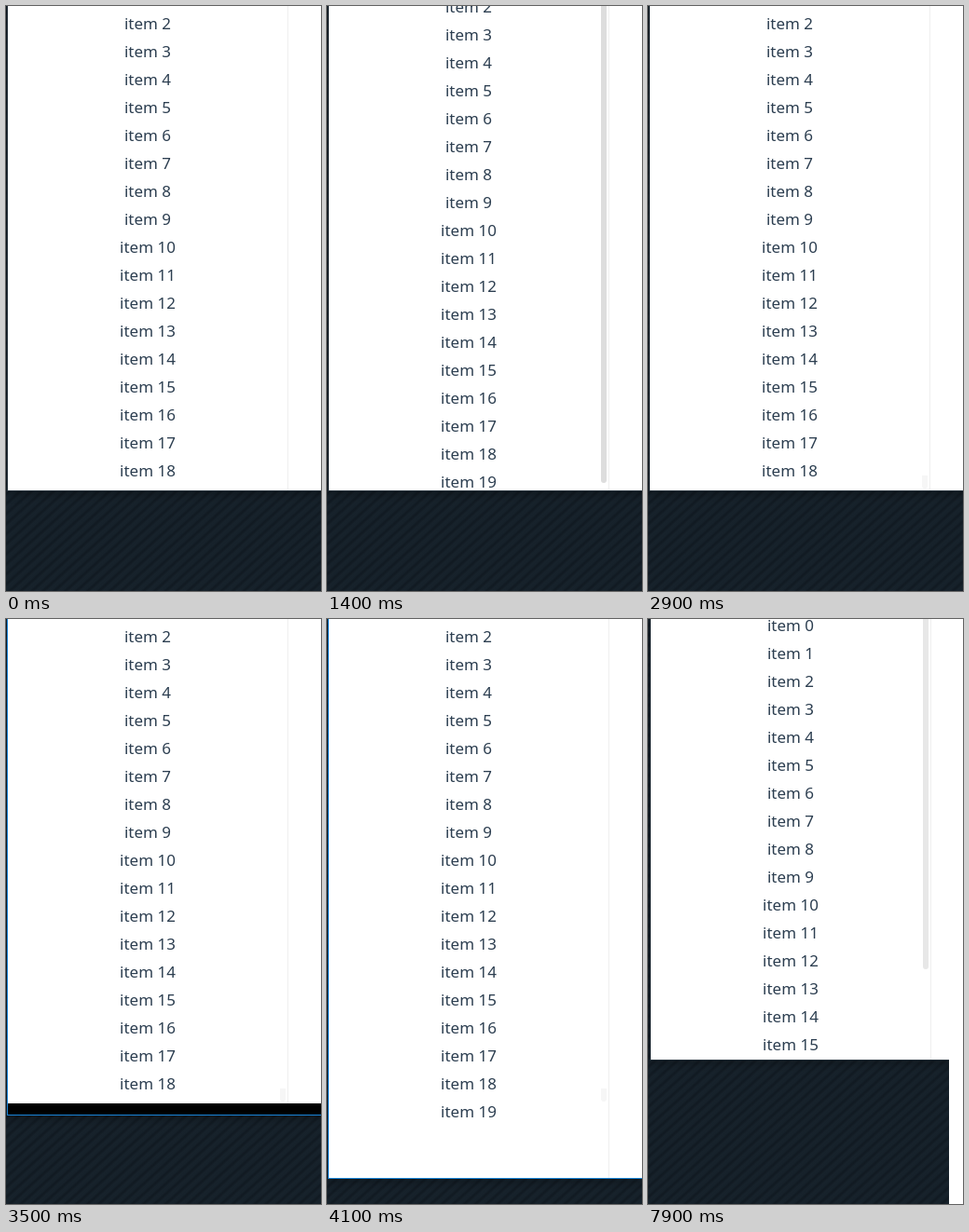
An HTML page for the animation above (8000 ms loop, 338 by 628 pixels).

```html
<!DOCTYPE html>
<html lang="en">
<head>
<meta charset="utf-8">
<title>Resizable scroll list</title>
<style>
  html, body { margin: 0; width: 100%; height: 100%; overflow: hidden; }
  #stage {
    position: relative; width: 338px; height: 628px; overflow: hidden;
    background: repeating-linear-gradient(138deg,
      #17222b 0, #16212a 3px, #111a22 5px, #121b23 6px, #17222b 8px);
  }
  #stage div, #stage svg { position: absolute; }
  #stage * { animation: 8s step-end infinite; }

  #win {
    left: 1px; top: 0; width: 360px; height: 520px;
    border: solid #26313a; border-width: 0 0 1px 1px;
    background: #000; box-shadow: 0 2px 10px rgba(0, 0, 0, .35);
    animation-name: win !important;
  }
  #panel {
    left: 0; top: 0; width: 100%; height: 520px; overflow: hidden;
    background: #fff; animation-name: panel !important;
  }
  #divider { left: 300px; top: 0; width: 1px; height: 100%; background: #efefef; }
  #list {
    left: 0; top: 0; width: 300px; height: 600px; overflow: visible;
    font: 17px "Noto Sans", "Open Sans", sans-serif; fill: #2c3e50;
    text-anchor: middle; animation-name: scroll !important;
  }
  #thumb, #trail { left: 292px; width: 6px; }
  #thumb {
    top: -20px; height: 515px; border-radius: 3px; background: #ddd;
    animation-name: thumb !important;
  }
  #trail {
    top: 504px; height: 14px; border-radius: 0 0 3px 3px; background: #f6f6f6;
    animation-name: trail !important;
  }
  #margin {
    left: 323px; top: 0; width: 15px; height: 628px; background: #fff;
    animation-name: margin !important;
  }

  /* Focus, drag the lower edge, release, then jump to the smaller window */
  @keyframes win {
    0%     { left: 1px; height: 520px; border-color: #26313a; }
    41.25% { left: 1px; height: 520px; border-color: #1883d7; }
    43.75% { left: 1px; height: 532px; border-color: #1883d7; }
    45%    { left: 1px; height: 546px; border-color: #1883d7; }
    46.25% { left: 1px; height: 560px; border-color: #1883d7; }
    47.5%  { left: 1px; height: 573px; border-color: #1883d7; }
    48.75% { left: 1px; height: 585px; border-color: #1883d7; }
    50%    { left: 1px; height: 595px; border-color: #1883d7; }
    51.25% { left: 1px; height: 600px; border-color: #1883d7; }
    95%    { left: 1px; height: 600px; border-color: #26313a; }
    96.25%, 100% { left: 2px; height: 473px; border-color: #26313a; }
  }
  /* The repaint trails the window edge by one step */
  @keyframes panel {
    0%     { height: 520px; }
    45%    { height: 532px; }
    46.25% { height: 546px; }
    47.5%  { height: 560px; }
    48.75% { height: 573px; }
    50%    { height: 585px; }
    51.25% { height: 600px; }
    96.25%, 100% { height: 473px; }
  }
  @keyframes scroll {
    0%     { transform: none; }
    17.5%  { transform: translateY(-18px); }
    18.75% { transform: translateY(-24px); }
    22.5%  { transform: translateY(-9px); }
    23.75% { transform: none; }
    96.25%, 100% { transform: translateY(48px); }
  }
  @keyframes thumb {
    0%     { opacity: 0; height: 515px; }
    2.5%   { opacity: 1; height: 515px; }
    17.5%  { opacity: 1; height: 532px; }
    18.75% { opacity: 1; height: 538px; }
    22.5%  { opacity: 1; height: 523px; }
    23.75% { opacity: 1; height: 515px; }
    36.25% { opacity: 0; height: 515px; }
    98.75%, 100% { opacity: .7; height: 396px; }
  }
  @keyframes trail {
    0%    { opacity: 0; }
    22.5% { opacity: 1; }
    96.25%, 100% { opacity: 0; }
  }
  @keyframes margin {
    0% { opacity: 0; }
    96.25%, 100% { opacity: 1; }
  }
</style>
</head>
<body>
<div id="stage">
  <div id="win">
    <div id="panel">
      <svg id="list"></svg>
      <div id="divider"></div>
      <div id="trail"></div>
      <div id="thumb"></div>
    </div>
  </div>
  <div id="margin"></div>
</div>
<script>
  const list = document.getElementById("list");
  for (let i = 0; i < 20; i++) {
    const row = document.createElementNS("http://www.w3.org/2000/svg", "text");
    row.setAttribute("x", 150);
    row.setAttribute("y", 30 * i - 35);
    row.textContent = "item " + i;
    list.append(row);
  }
</script>
</body>
</html>
```
